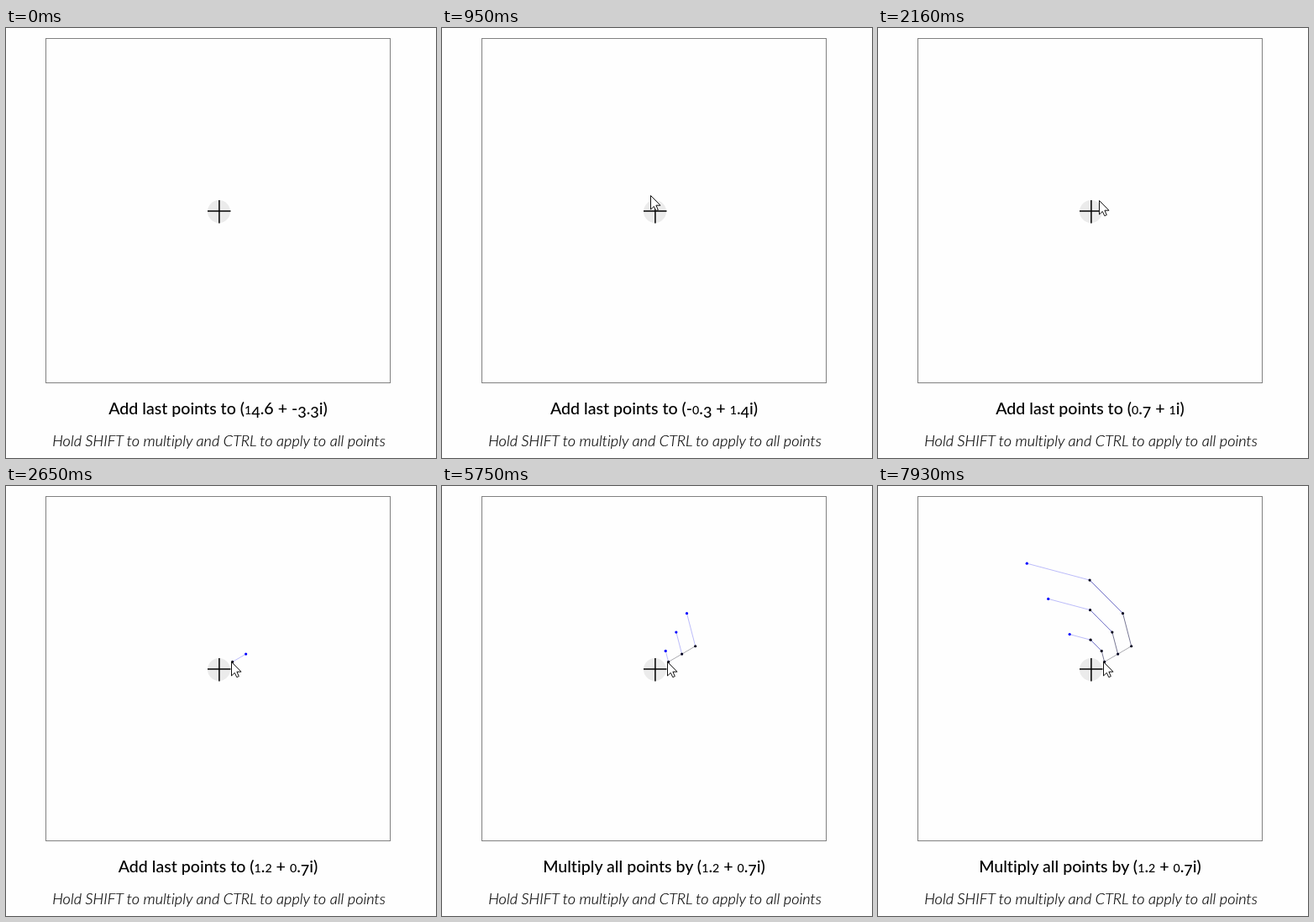
Recreate the animation shown at these times as an HTML page. Size 512 px wide and 512 px high, loop 8000 ms.

```html
<!DOCTYPE html>
<html lang="en">
<head>
<meta charset="utf-8">
<title>Complex points</title>
<style>
  html, body { margin: 0; width: 100%; height: 100%; overflow: hidden; background: #fefefe; }
  svg { display: block; width: 100vw; height: 100vh; }
  text { font-family: Lato, "Open Sans", sans-serif; text-anchor: middle; font-variant-ligatures: none; }
  #label { font-size: 19.6px; font-weight: 500; }
  #hint { font-size: 18.1px; font-weight: 300; font-style: italic; stroke: #000; stroke-width: .15px; }
  .small { font-size: 14.2px; }
  .low { font-size: 18px; baseline-shift: -4px; }
</style>
</head>
<body>
<svg viewBox="0 0 512 512">
  <rect width="512" height="512" fill="#fefefe"/>
  <rect x="47.5" y="12.5" width="410" height="410" fill="none" stroke="#808080"/>
  <circle cx="253.5" cy="218.5" r="13.5" fill="#ebebeb"/>
  <path d="M240 218.1H267.5M253.9 205V232.5" stroke="#000" stroke-width="1.5"/>
  <g id="plot"></g>
  <path id="cursor" d="M.5 .5V17L4.3 13.4L6.8 18.7L9.3 17.6L6.9 12.2H12Z" fill="#fff" stroke="#111"/>
  <text id="label" x="252.5" y="460"></text>
  <text id="hint" x="253.5" y="498">Hold SHIFT to multiply and CTRL to apply to all points</text>
</svg>
<script>
const LOOP = 8000, STEP = 60, SCALE = 13.4, ORIGIN = [253.6, 218.8];
const FACTOR = [1.196, 0.698];
const ENTER = 440, MULTIPLY_LAST = 5250, MULTIPLY_ALL = 5750;
const ADD_CLICKS = [2650, 3760, 4760], MULTIPLY_CLICKS = [6930, 7810];
const [plot, cursor, label] = ["plot", "cursor", "label"].map(id => document.getElementById(id));

// Pointer glides: each starts where the previous one ended
const home = { x: 488, y: 262.2 };
const glides = [
  { from: ENTER, to: 950, x: 248.4, y: 199 },
  { from: 950, to: 1240, x: 260.4, y: 206 },
  { from: 1370, to: 1550, x: 262.6, y: 205 },
  { from: 2160, to: 2280, x: 268.2, y: 209 }
];

const countPast = (times, t) => times.filter(time => time <= t).length;
const multiply = ([a, b], [c, d]) => [a * c - b * d, a * d + b * c];
const times = n => FACTOR.map(v => v * n);
const toScreen = ([a, b]) => [ORIGIN[0] + a * SCALE, ORIGIN[1] - b * SCALE];
const easeInOut = k => k * k * (3 - 2 * k);

function pointerAt(t) {
  let { x, y } = home;
  for (const glide of glides) {
    if (t < glide.from) break;
    const held = Math.floor((t - glide.from) / STEP) * STEP;
    const k = t >= glide.to ? 1 : easeInOut(held / (glide.to - glide.from));
    x += (glide.x - x) * k;
    y += (glide.y - y) * k;
  }
  return [x, y];
}

// The reading stops changing near the right edge of the plane
function readingAt([x, y]) {
  const re = (Math.min(x, 448.3) - 252.7) / SCALE, im = (218 - y) / SCALE;
  return `(${+re.toFixed(1)} + ${+im.toFixed(1)}i)`;
}

const oldStyle = text => text.replace(/[0-579]/g, digit =>
  `<tspan class="${digit < 3 ? "small" : "low"}">${digit}</tspan>`);

function add(tag, attrs) {
  const node = document.createElementNS("http://www.w3.org/2000/svg", tag);
  for (const key in attrs) node.setAttribute(key, attrs[key]);
  plot.append(node);
}

function drawLine(from, to, stroke) {
  const [x1, y1] = toScreen(from), [x2, y2] = toScreen(to);
  add("line", { x1, y1, x2, y2, stroke });
}

function drawDot(point, fill) {
  const [cx, cy] = toScreen(point);
  add("circle", { cx, cy, r: 1.6, fill });
}

function drawPlot(t) {
  plot.replaceChildren();
  const placed = countPast(ADD_CLICKS, t);
  if (!placed) return;
  const base = Array.from({ length: placed }, (_, i) => times(i + 1));
  const dots = base.map(point => [point, "#00001e"]);
  base.slice(1).forEach((point, i) => drawLine(base[i], point, "#aaaab0"));

  const extend = (from, to, preview, stroke) => {
    drawLine(from, to, preview ? "#bcbcfa" : stroke);
    dots.push([to, preview ? "#0000ff" : "#00001e"]);
  };

  if (t < MULTIPLY_LAST) {
    extend(base.at(-1), times(placed + 1), true);
  } else {
    const turns = countPast(MULTIPLY_CLICKS, t);
    let row = t < MULTIPLY_ALL ? base.slice(-1) : base;
    for (let turn = 0; turn <= turns; turn++) {
      row = row.map(point => {
        const moved = multiply(point, FACTOR);
        extend(point, moved, turn === turns, turn ? "#6c6cc4" : "#777794");
        return moved;
      });
    }
  }
  dots.forEach(dot => drawDot(...dot));
}

function render(t) {
  const pointer = pointerAt(t);
  cursor.setAttribute("transform", `translate(${pointer.map(Math.round)})`);
  cursor.setAttribute("visibility", t < ENTER ? "hidden" : "visible");
  const action = t < MULTIPLY_LAST ? "Add last points to"
    : `Multiply ${t < MULTIPLY_ALL ? "last" : "all"} points by`;
  label.innerHTML = oldStyle(`${action} ${readingAt(pointer)}`);
  drawPlot(t);
}

const start = performance.now();
function tick() {
  render((performance.now() - start) % LOOP);
  requestAnimationFrame(tick);
}
render(0);
tick();
</script>
</body>
</html>
```
